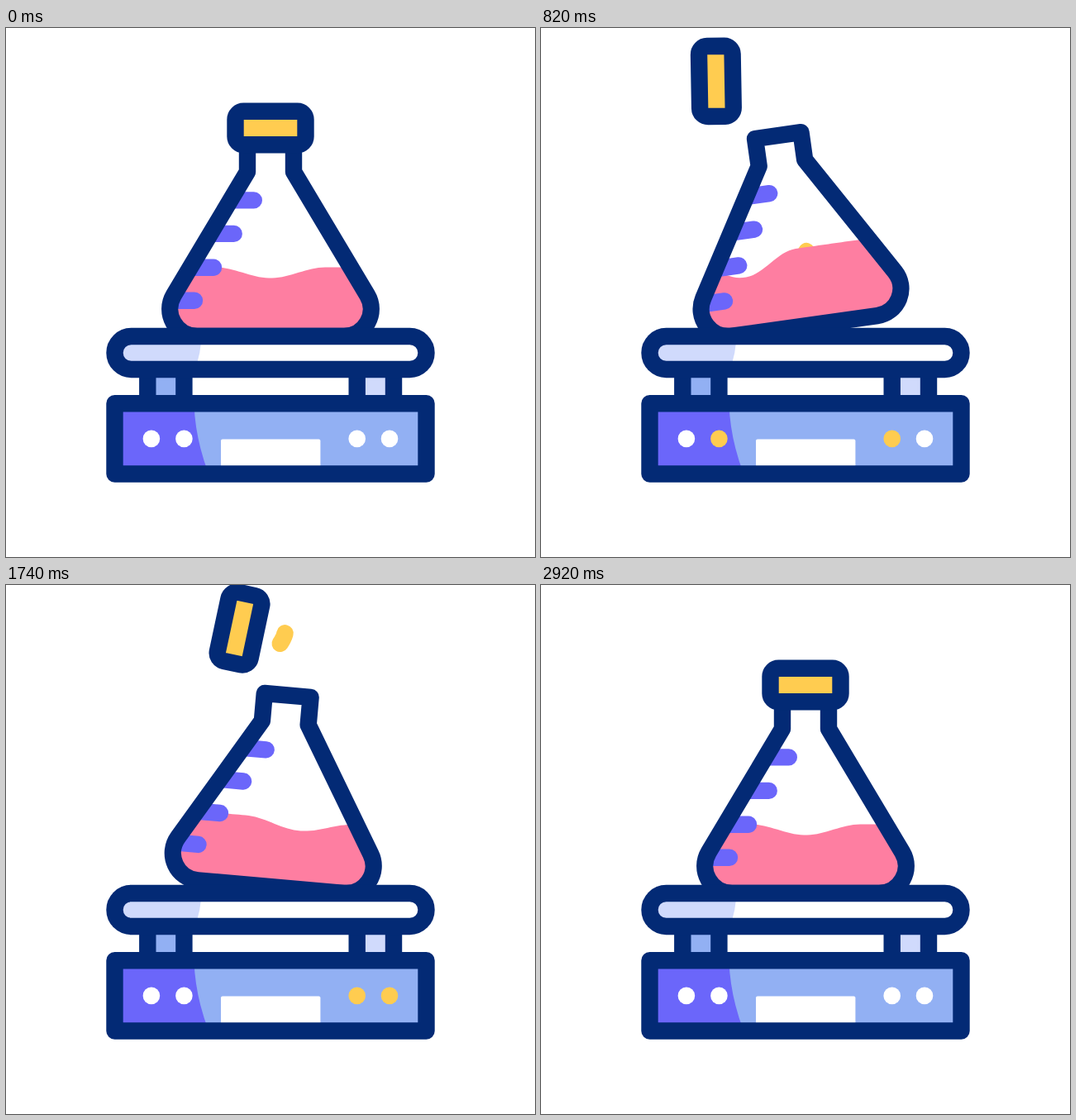
An HTML page for the animation above (3600 ms loop, 640 by 640 pixels).

```html
<!DOCTYPE html>
<html lang="en">
<head>
<meta charset="utf-8">
<title>Flask on a shaker</title>
<style>
  html, body { margin: 0; width: 100%; height: 100%; overflow: hidden; background: #fff; }
  svg { display: block; width: 100vw; height: 100vh; }
  .line { fill: none; stroke: #032a75; stroke-width: 20.4; stroke-linejoin: round; }
  .marks { fill: none; stroke: #6b66fa; stroke-width: 20.4; stroke-linecap: round; }
  .gas { fill: none; stroke: #ffcc50; stroke-width: 20.4; stroke-linecap: round; stroke-linejoin: round; }
</style>
</head>
<body>
<svg viewBox="0 0 640 640">
  <defs>
    <path id="glass" d="M292 140.5H348V174L437 323A33 33 0 0 1 408.5 373H231.5A33 33 0 0 1 203 323L292 174Z"/>
    <clipPath id="inside"><use href="#glass"/></clipPath>
  </defs>

  <g id="flask">
    <use href="#glass" fill="#fff"/>
    <path id="gas" class="gas"/>
    <path id="liquid" fill="#fe7ea1" clip-path="url(#inside)"/>
    <path class="marks" d="M276 208.4H299.8M252 248.9H275.7M228 289.7H251M205 329.8H228"/>
    <use href="#glass" class="line"/>
    <g id="cap">
      <rect class="line" x="-42.5" y="-20.3" width="85" height="40.6" rx="10" style="fill:#ffcc50"/>
    </g>
  </g>

  <g id="shaker">
    <path fill="#92b0f3" d="M181 420H206V447H181Z"/>
    <path fill="#d0dafc" d="M434 420H460V447H434Z"/>
    <path class="line" d="M171.3 415V452M215.4 415V452M424.7 415V452M469 415V452"/>
    <rect x="131.5" y="373" width="377" height="40" rx="20" fill="#fff"/>
    <path fill="#d0dafc" d="M236 380Q235 393 231 406H140V380Z"/>
    <rect class="line" x="131.5" y="373" width="377" height="40" rx="20"/>
    <path fill="#92b0f3" d="M132 455H508V539H132Z"/>
    <path fill="#6b66fa" d="M132 455H227.5Q229 497 245 539H132Z"/>
    <rect x="260" y="497.4" width="120.4" height="40" rx="2" fill="#fff"/>
    <path class="line" d="M131.5 454.3H508.5V539.5H131.5Z"/>
    <g id="lights">
      <circle cx="175.9" cy="496.9" r="10.3"/>
      <circle cx="215.4" cy="496.9" r="10.3"/>
      <circle cx="424.7" cy="496.9" r="10.3"/>
      <circle cx="464" cy="496.9" r="10.3"/>
    </g>
  </g>
</svg>
<script>
const LOOP = 3600, END = 2920, STEP = 20, LIGHTS_OUT = 2780;
const el = id => document.getElementById(id);
const lamps = [...el('lights').children];

const part = (v, from, to) => Math.min(1, Math.max(0, (v - from) / (to - from)));
// Eased step from 0 to 1.
const ramp = (v, from, to) => (1 - Math.cos(Math.PI * part(v, from, to))) / 2;

// Polyline through [x, y] = point(0..1).
function trace(point, steps) {
  const pts = [];
  for (let i = 0; i <= steps; i++) pts.push(point(i / steps).map(n => n.toFixed(2)).join(' '));
  return 'M' + pts.join('L');
}

const tilt = t => -8 * ramp(t, 0, 820) + 13.05 * ramp(t, 920, 1710)
  - 7.65 * ramp(t, 1710, 2480) + 2.6 * ramp(t, 2480, END);

// The cap pops up, swings past its resting place, settles and later returns.
function capPose(t) {
  const back = ramp(t, 1960, 2400);
  const swing = 1.56 * ramp(t, 175, 477) - 0.56 * ramp(t, 477, 645) - back;
  const lift = ramp(t, 60, 365) - back;
  return `translate(${320 - 65 * swing} ${121 - 56 * lift}) rotate(${-83 * swing})`;
}

// One trough wanders through the liquid; the wave grows as it moves left.
function liquidPath(t) {
  const trough = 320 - 64 * ramp(t, 250, 820) + 93 * ramp(t, 820, 1450) - 29 * ramp(t, 1740, 2600);
  const surge = Math.max(0, (320 - trough) / 64);
  const level = 296 - 4 * surge, height = 6.5 * (1 + surge);
  const surface = p => {
    const x = 150 + 320 * p;
    return [x, level + height * Math.cos(Math.PI * part(Math.abs(x - trough), 0, 67))];
  };
  return trace(surface, 80) + 'V380H150Z';
}

// A wavy thread of gas rises through the neck and drifts left above it.
function gasPath(t) {
  if (t < 760 || t >= 1800) return '';
  const top = 310 - 250 * part(t, 760, 1770) ** 0.8;
  const bottom = 310 - 250 * part(t, 960, 1804);
  return trace(p => {
    const y = top + (bottom - top) * p;
    return [305 + 29.5 * ramp(y, 80, 150) + 5.5 * Math.cos(2 * Math.PI * (y - 199) / 68), y];
  }, 50);
}

// Each lamp blinks evenly with its own start and half period.
const blinks = [
  { start: 20, half: 460 },
  { start: 660, half: 280 },
  { start: 480, half: 460 },
  { start: 560, half: 240 }
];
const isLit = (t, { start, half }) =>
  t >= start && t < LIGHTS_OUT && Math.floor((t - start) / half) % 2 === 0;

function draw(time) {
  const t = Math.min(END, Math.floor(time / STEP) * STEP);
  const angle = tilt(t);
  const pivot = angle < 0 ? 229 : 411;
  el('flask').setAttribute('transform', `rotate(${angle} ${pivot} 373)`);
  el('cap').setAttribute('transform', capPose(t));
  el('liquid').setAttribute('d', liquidPath(t));
  el('gas').setAttribute('d', gasPath(t));
  lamps.forEach((lamp, i) => lamp.setAttribute('fill', isLit(t, blinks[i]) ? '#ffcc50' : '#fff'));
}

const start = performance.now();
function tick() {
  draw((performance.now() - start) % LOOP);
  requestAnimationFrame(tick);
}
tick();
</script>
</body>
</html>
```
